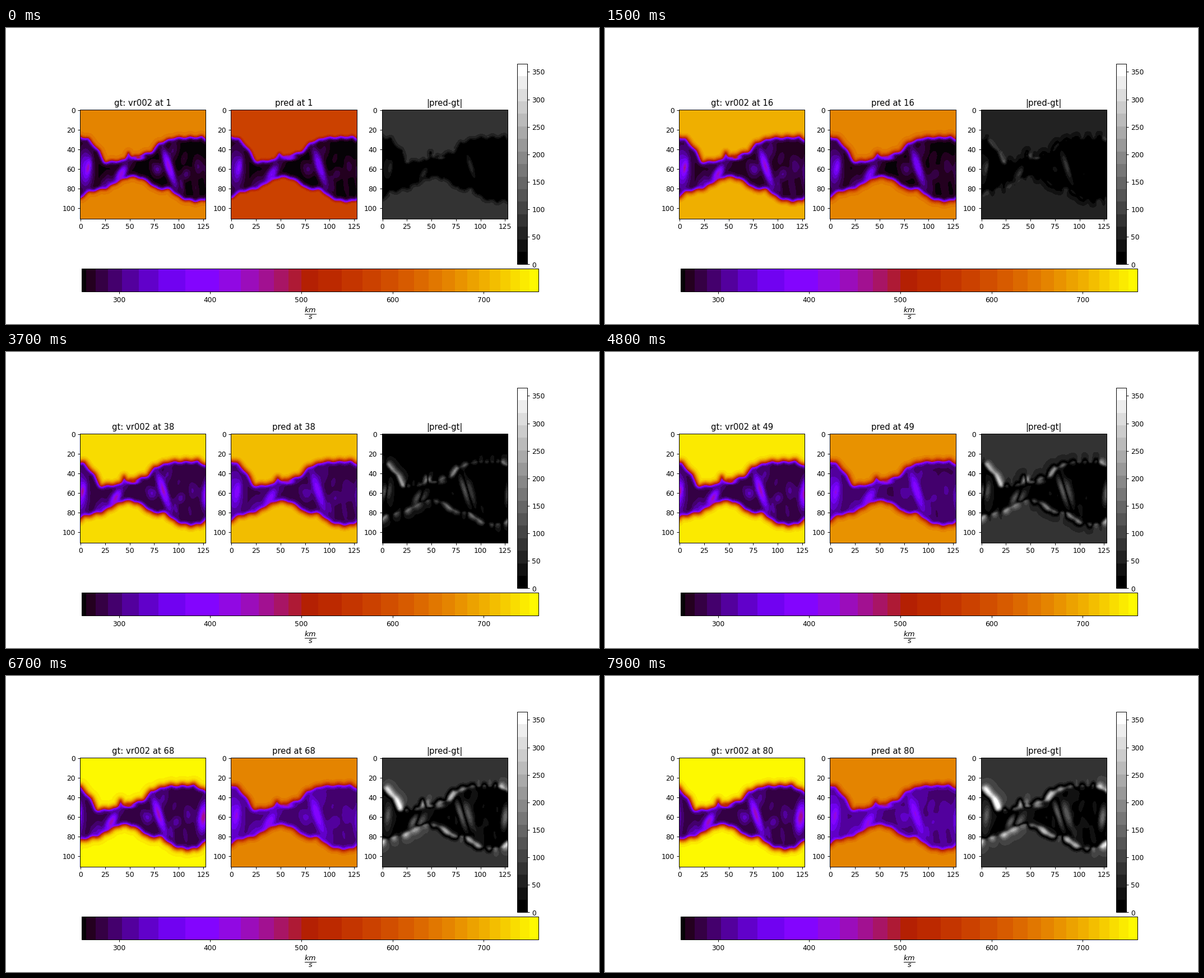
These frames come from a looping animation (1058 px wide and 529 px high, 8 s). A matplotlib script:

```python
import numpy as np
import matplotlib.pyplot as plt
from matplotlib.animation import FuncAnimation
from matplotlib.colors import BoundaryNorm, ListedColormap

W, H = 1058, 529
NX, NY, WIDE = 128, 111, 144
STEPS = 80
VMIN, VMAX, BANDS = 259, 760, 30

# Rough outline of the slow stream, in cells
TOP = [(0, 26), (9, 28.5), (20, 41), (25, 51.5), (45, 49.5),
       (72, 41), (79, 32.5), (95, 27), (124, 26), (140, 35)]
BOTTOM = [(0, 90.5), (8, 84.5), (28, 80), (38, 74), (50, 68.5), (62, 70.5),
          (78, 81.5), (90, 81.5), (102, 91), (115, 94), (126, 93), (140, 83)]

# Main bright spots: x, y, x size, y size, lean, height
SPOTS = [(5, 60, 5, 13, 0, 100), (8, 58, 1.6, 5, -.15, 110),
         (42, 64, 2.8, 5, -.4, 160), (59, 48.5, 3.5, 1.3, -.2, 210),
         (89.5, 57, 2.5, 10, .3, 170), (135, 60, 3.2, 9, -.1, 190)]

gx, gy = np.meshgrid(np.arange(WIDE), np.arange(NY))


def bell(u):
    return np.exp(-.5 * u * u)


def outline(points, notch, blur):
    xs = np.arange(-10, WIDE + 10, .4)
    ys = np.interp(xs, *zip(*points)) + .6 * np.sin(.55 * xs)
    ys -= notch * bell((xs - 48.5) / 1.7)
    k = bell(np.arange(-12, 13) * .4 / blur)
    return xs, np.convolve(np.pad(ys, 12, mode="edge"), k / k.sum(), "valid")


def depth_map(blur):
    """Distance to the outline, positive inside the stream."""
    top, low = outline(TOP, 7, blur), outline(BOTTOM, 0, blur)
    near = np.full(gx.shape, 1e9)
    for x, y in zip(np.append(top[0], low[0]), np.append(top[1], low[1])):
        near = np.minimum(near, (gx - x) ** 2 + (gy - y) ** 2)
    inside = (gy > np.interp(gx, *top)) & (gy < np.interp(gx, *low))
    return np.where(inside, 1, -1) * np.sqrt(near)


def faint_spots(count):
    rng = np.random.default_rng(12)
    low = [20, 36, 1.5, 3, -.2, 12]
    high = [130, 80, 3.5, 7, .3, 42]
    return rng.uniform(low, high, (count, 6))


def spot_map(height, spread):
    out = np.zeros(gx.shape)
    for x, y, sx, sy, lean, h in [*SPOTS, *faint_spots(22)]:
        u = (gx - x - lean * (gy - y)) / (sx * spread)
        out += h * height * bell(u) * bell((gy - y) / (sy * spread))
    return out


def slide(field, s):
    i = int(s)
    f = s - i
    return field[:, i:i + NX] * (1 - f) + field[:, i + 1:i + NX + 1] * f


def stream(depth, inner, sky, base, blur):
    rim = np.where(depth > 1, 1, blur)
    mix = 1 / (1 + np.exp(np.clip((depth - 1) / rim, -40, 40)))
    core = base + inner
    return core + (sky - core) * mix


gt_depth, pred_depth = depth_map(.6), depth_map(1.3)
gt_inner, pred_inner = spot_map(1, 1), spot_map(.65, 1.15)


def fields(n):
    t = (n - 1) / (STEPS - 1)
    blur = 1.6 - .6 * np.exp(-9 * t)
    fade = np.exp(-(n - 1) / 22)
    gt = stream(slide(gt_depth, 9.5 * t), slide(gt_inner, 12 * t),
                757 - 101 * fade, 281 - 20 * fade, blur)

    sky = np.interp(n, [1, 16, 25, 37, 49, 63, 73, 80],
                    [584, 658, 721, 722, 676, 676, 650, 664])
    base = np.interp(n, [1, 16, 25, 80], [259, 262, 277, 301])
    drift = 2.8 * t ** .7
    pred = stream(slide(pred_depth, drift), slide(pred_inner, drift),
                  sky, base, blur)
    return gt, pred, np.abs(pred - gt)


def heat_bands():
    """Split gnuplot into bands of equal visible colour change."""
    x = np.linspace(0, 1, 2001)
    rgb = np.stack([np.sqrt(x), x ** 3, np.sin(2 * np.pi * x).clip(0)], 1)
    change = np.abs(np.diff(rgb, axis=0)) @ [.3, .59, .11]
    total = np.append(0, np.cumsum(change))
    edges = np.interp(np.linspace(0, total[-1], BANDS + 1), total, x)
    colors = plt.get_cmap("gnuplot")((edges[1:] + edges[:-1]) / 2)
    colors[0] = .025, .01, .025, 1
    return (ListedColormap(colors),
            BoundaryNorm(VMIN + edges * (VMAX - VMIN), BANDS))


plt.rcParams["font.family"] = "DejaVu Sans"
fig = plt.figure(figsize=(12, 6), dpi=88.1667, facecolor="white")


def box(x0, y0, x1, y1):
    return fig.add_axes([x0 / W, 1 - y1 / H, (x1 - x0) / W, (y1 - y0) / H])


heat, heat_norm = heat_bands()
looks = [dict(cmap=heat, norm=heat_norm)] * 2
looks.append(dict(cmap=plt.get_cmap("gray", 16), vmin=0, vmax=365))

axes, images = [], []
for i, (data, look) in enumerate(zip(fields(1), looks)):
    left = 132.25 + 269.2 * i
    ax = box(left, 146.1, left + 224.2, 340.6)
    images.append(ax.imshow(data, aspect="auto", **look))
    ax.set_xticks(range(0, 126, 25))
    ax.set_yticks(range(0, 101, 20))
    axes.append(ax)
axes[2].set_title("|pred-gt|")

wide = fig.colorbar(images[0], cax=box(135, 430.5, 949.7, 471),
                    orientation="horizontal", spacing="proportional",
                    ticks=range(300, 701, 100))
wide.minorticks_off()
fig.colorbar(images[2], cax=box(912, 63.7, 929.7, 422.5),
             ticks=range(0, 351, 50))
fig.text(542.5 / W, 1 - 510 / H, r"$\frac{km}{s}$", fontsize=15,
         ha="center", va="center")


def draw(frame):
    n = frame + 1
    for im, data in zip(images, fields(n)):
        im.set_data(data)
    axes[0].set_title(f"gt: vr002 at {n}")
    axes[1].set_title(f"pred at {n}")
    return images


anim = FuncAnimation(fig, draw, frames=STEPS, init_func=lambda: draw(0),
                     interval=100, repeat=True, repeat_delay=0, blit=False)
plt.show()
```
